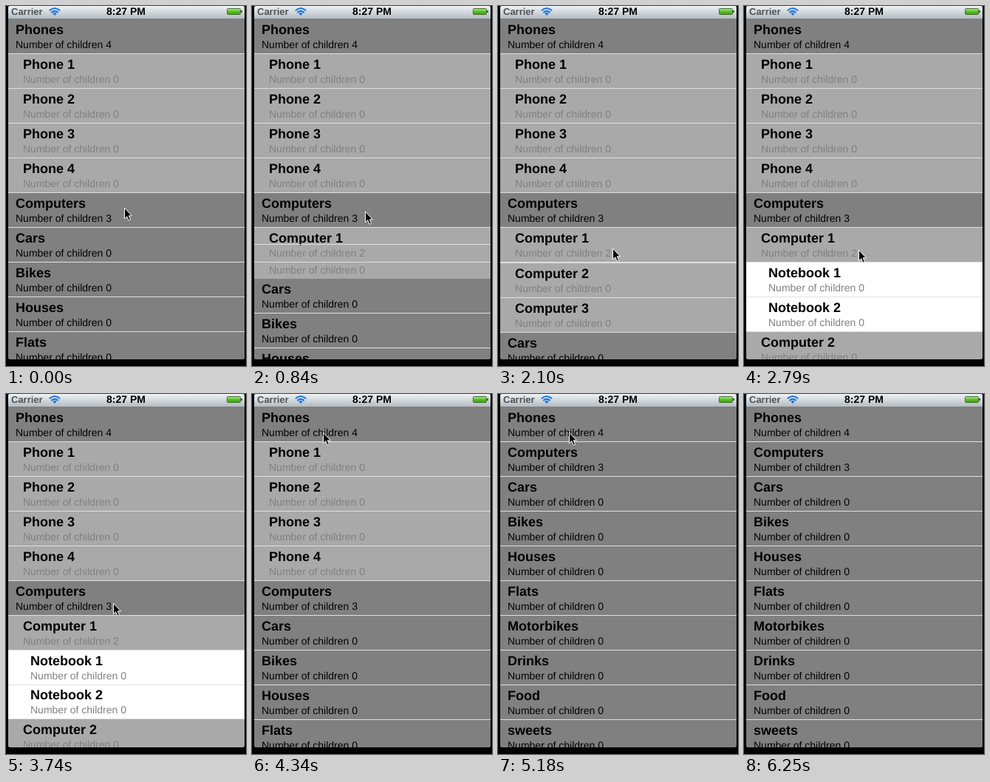
An HTML page that plays this animation: 325 by 487 pixels, repeating every 6580 ms.

```html
<!DOCTYPE html>
<html lang="en">
<head>
<meta charset="utf-8">
<title>Expandable list</title>
<style>
  html, body { margin: 0; width: 100%; height: 100%; overflow: hidden; background: #000; }
  svg { display: block; width: 100vw; height: 100vh; }
  text { font-family: "Liberation Sans", Arial, sans-serif; text-rendering: geometricPrecision; }
  .title { font-size: 18px; font-weight: bold; }
  .sub { font-size: 14px; }
  .bar { font-size: 13px; font-weight: bold; }
</style>
</head>
<body>
<svg viewBox="0 0 325 487">
  <defs>
    <linearGradient id="barFill" x2="0" y2="1">
      <stop offset="0" stop-color="#eef2f4"/>
      <stop offset="1" stop-color="#b4bcc2"/>
    </linearGradient>
    <linearGradient id="charge" x2="0" y2="1">
      <stop offset="0" stop-color="#b6ec8c"/>
      <stop offset=".5" stop-color="#55c21d"/>
      <stop offset="1" stop-color="#3f9f12"/>
    </linearGradient>
    <clipPath id="screen">
      <path d="M3 17H323V475Q323 478 320 478H6Q3 478 3 475Z"/>
    </clipPath>
  </defs>
  <rect width="325" height="487"/>
  <g clip-path="url(#screen)">
    <rect x="3" y="17" width="320" height="461" fill="#808080"/>
    <g id="list"></g>
  </g>
  <path d="M3 17V2Q3 0 5 0H321Q323 0 323 2V17Z" fill="url(#barFill)"/>
  <text class="bar" x="7" y="12" fill="#505356">Carrier</text>
  <g fill="none" stroke="#1c74e0" stroke-width="2">
    <path d="M58.8 6.3Q66 -.3 73.2 6.3M61.4 9Q66 4.8 70.6 9"/>
    <path d="M63.4 10.2Q66 8 68.6 10.2L66 13Z" fill="#1c74e0" stroke="none"/>
  </g>
  <text class="bar" x="162.5" y="12" text-anchor="middle" style="font-size:14px">8:27 PM</text>
  <rect x="299.5" y="3.5" width="18" height="8" rx="1" fill="url(#charge)" stroke="#4c6a3c"/>
  <rect x="318" y="6" width="2" height="3" fill="#4c6a3c"/>
  <path id="cursor" d="M.5 1V15.7L3.8 12.7 6.2 18.2 8.6 17.2 6.2 11.8H10.4Z" stroke="#fff"/>
</svg>
<script>
const LOOP = 6580, ROW = 47, TOP = 18, SLIDE = 300;
const SVG = 'http://www.w3.org/2000/svg';
const list = document.getElementById('list');
const cursor = document.getElementById('cursor');

const FILLS = ['#808080', '#a9a9a9', '#fff'];
const SUB_FILLS = ['#000', '#808080', '#808080'];

// When each group opens and closes.
const GROUPS = {
  phones: { open: -SLIDE, close: 4861.8 },
  computers: { open: 692, close: 3723 },
  notebooks: { open: 2076, close: 3723 }
};

// Bursts of motion: first update, last update, number of updates.
const BURSTS = [
  [60, 540, 9], [720, 1020, 6], [1380, 1560, 4], [2100, 2370, 5],
  [2790, 3320, 10], [3740, 4340, 11], [4880, 5180, 6], [5660, 6250, 11]
];

// Cursor path: time, x, y.
const PATH = [
  [0, 160, 272], [280, 157, 300], [540, 153, 277],
  [1320, 153, 277], [1560, 155, 327],
  [2730, 155, 327], [2910, 156, 334], [3200, 147, 272], [3320, 145, 282],
  [4040, 145, 282], [4340, 96, 51],
  [5600, 96, 51], [6250, 284, 490]
];

function make(tag, attrs, parent, content = '') {
  const node = document.createElementNS(SVG, tag);
  for (const key in attrs) node.setAttribute(key, attrs[key]);
  node.textContent = content;
  return parent.appendChild(node);
}

function makeRow(title, count = 0, level = 0, group = null) {
  const node = make('g', {}, list);
  const x = 13 + level * 10;
  make('rect', { x: 3, width: 320, height: ROW, fill: FILLS[level] }, node);
  make('text', { class: 'title', x, y: 20 }, node, title);
  make('text', { class: 'sub', x, y: 39, fill: SUB_FILLS[level] }, node, `Number of children ${count}`);
  const line = { x: 3, y: ROW - 1, width: 320, height: 1, fill: '#e0e0e0' };
  make('rect', line, node);
  const edge = make('rect', line, node);
  return { node, edge, group: GROUPS[group] };
}

const rows = [
  makeRow('Phones', 4),
  ...[1, 2, 3, 4].map(n => makeRow(`Phone ${n}`, 0, 1, 'phones')),
  makeRow('Computers', 3),
  makeRow('Computer 1', 2, 1, 'computers'),
  ...[1, 2].map(n => makeRow(`Notebook ${n}`, 0, 2, 'notebooks')),
  ...[2, 3].map(n => makeRow(`Computer ${n}`, 0, 1, 'computers')),
  ...['Cars', 'Bikes', 'Houses', 'Flats', 'Motorbikes', 'Drinks', 'Food', 'sweets'].map(name => makeRow(name))
];

const clamp = v => Math.min(1, Math.max(0, v));
const smooth = s => s * s * (3 - 2 * s);

// cubic-bezier(.42, 0, .58, 1)
function easeInOut(x) {
  if (x <= 0 || x >= 1) return clamp(x);
  let lo = 0, hi = 1;
  for (let i = 0; i < 20; i++) {
    const s = (lo + hi) / 2, r = 1 - s;
    if (3 * r * s * (.42 * r + .58 * s) + s ** 3 < x) lo = s; else hi = s;
  }
  return smooth(lo);
}

function sampleTime(t) {
  const burst = BURSTS.filter(b => b[0] <= t).pop();
  if (!burst) return 0;
  const [start, end, count] = burst;
  const step = (end - start) / (count - 1);
  return start + Math.min(count - 1, Math.floor((t - start) / step + 1e-6)) * step;
}

function openness(group, t) {
  if (!group) return 1;
  return easeInOut((t - group.open) / SLIDE) - easeInOut((t - group.close) / SLIDE);
}

function drawRows(t) {
  let y = TOP;
  const sliding = [], settled = [];
  for (const row of rows) {
    const open = openness(row.group, t);
    const visible = open > 0 && y < 478;
    row.node.setAttribute('visibility', visible ? 'visible' : 'hidden');
    row.node.setAttribute('transform', `translate(0 ${Math.round(y)})`);
    const opening = row.group && t < row.group.close;
    row.edge.setAttribute('y', opening ? Math.max(0, Math.round(ROW * open) - 1) : ROW - 1);
    (open < 1 ? sliding : settled).push(row.node);
    y += ROW * open;
  }
  // Upper sliding rows cover lower ones; settled rows cover both.
  list.append(...sliding.reverse(), ...settled);
}

function drawCursor(t) {
  const next = PATH.findIndex(p => p[0] > t);
  const b = PATH[next < 0 ? PATH.length - 1 : next];
  const a = next < 0 ? b : PATH[next - 1];
  const k = a === b ? 1 : smooth((t - a[0]) / (b[0] - a[0]));
  const at = i => Math.round(a[i] + (b[i] - a[i]) * k);
  cursor.setAttribute('transform', `translate(${at(1)} ${at(2)})`);
}

let shown = -1;
function render(now) {
  const t = sampleTime(now % LOOP);
  if (t !== shown) {
    shown = t;
    drawRows(t);
    drawCursor(t);
  }
}

function tick() {
  render(performance.now() - began);
  requestAnimationFrame(tick);
}

const began = performance.now();
tick();
</script>
</body>
</html>
```
